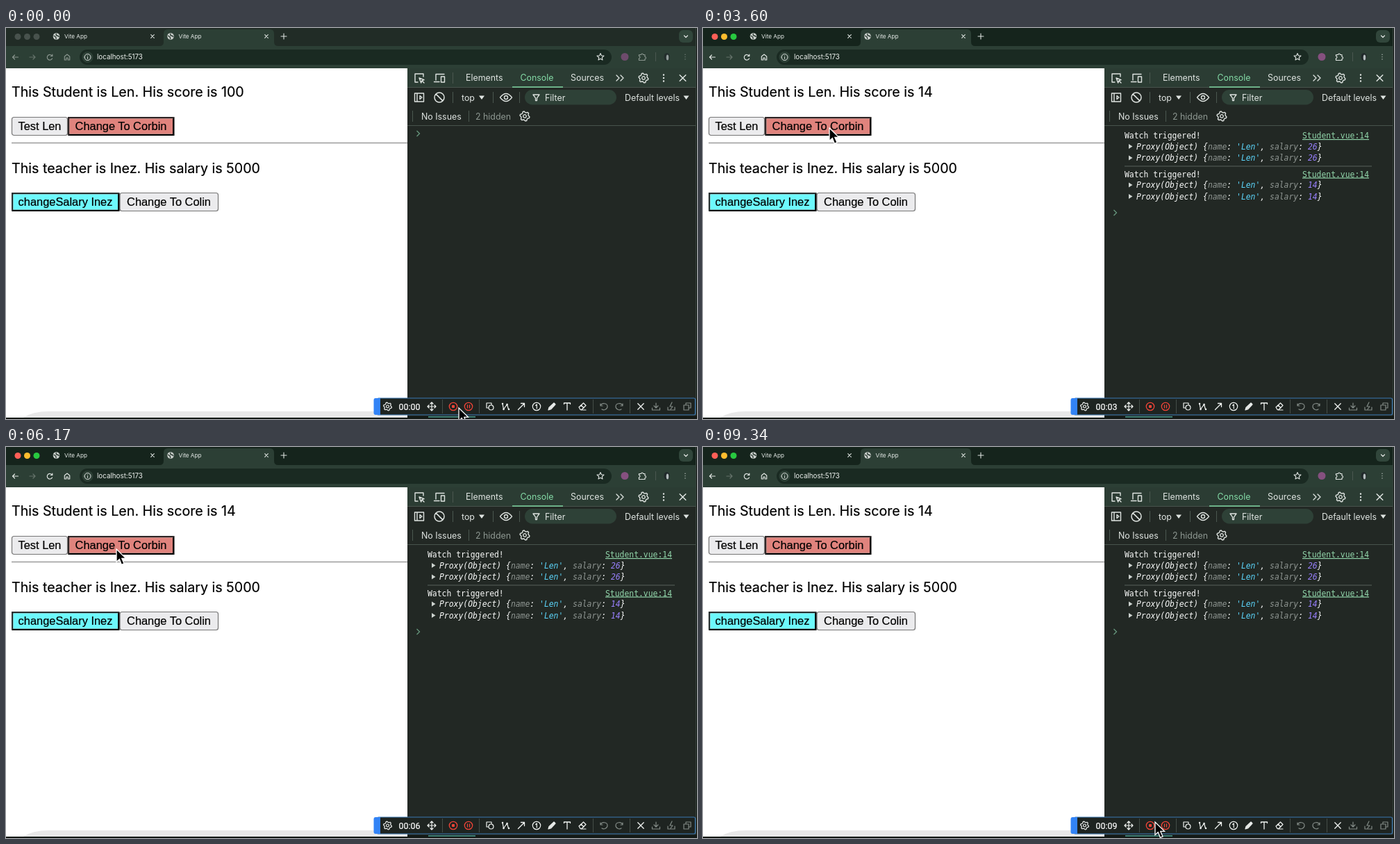
These frames come from a looping animation (995x563 px, 9430 ms). An HTML page:

```html
<!DOCTYPE html>
<html lang="en">
<head>
<meta charset="utf-8">
<title>Vite App</title>
<style>
  html, body { margin: 0; width: 100%; height: 100%; overflow: hidden; background: #111; }
  svg { display: block; width: 100vw; height: 100vh; }
  text { white-space: pre; font-family: Inter, sans-serif; }
  .tab { font-size: 8.2px; fill: #e6ebe8; }
  .page { font-size: 19.65px; fill: #000; stroke: #000; stroke-width: .2; }
  .button { font: 16.4px "Liberation Sans", Arial, sans-serif; fill: #000; stroke: #000; stroke-width: .2; text-anchor: middle; }
  .tools { font-size: 12.4px; fill: #dfe4e1; }
  .log { font: 11.4px "DejaVu Sans Mono", monospace; fill: #fafbfa; }
  .value { font-style: italic; }
  .key { fill: #8f9692; }
  .string { fill: #5cd5fb; }
  .number { fill: #9980ff; }
  .link { fill: #91d5aa; text-decoration: underline; }
</style>
</head>
<body>
<svg viewBox="0 0 995 563">
  <defs>
    <g id="gear" fill="none" stroke-linejoin="round">
      <path id="cog" stroke-width="1.4"/>
      <circle r="2.3" stroke-width="1.3"/>
    </g>
    <g id="globe">
      <circle r="4.8" fill="#c9cfcb"/>
      <path d="M-4 -1Q-2 0 -1 1T-.5 4M0-4Q-1-1 1-1T4 1" fill="none" stroke="#26352d" stroke-width="1.3"/>
    </g>
  </defs>

  <!-- Browser frame -->
  <path id="strip" d="M0 0H993V30H0Z"/>
  <path fill="#2c3f35" d="M0 26H221Q227 26 227 20V8Q227 2 233 2H380Q386 2 386 8V20Q386 26 392 26H993V58H0Z"/>
  <g id="lights"><circle cx="17" cy="12.5" r="4.5"/><circle cx="30.5" cy="12.5" r="4.5"/><circle cx="44" cy="12.5" r="4.5"/></g>
  <use href="#globe" x="72.5" y="12"/>
  <use href="#globe" x="237" y="12"/>
  <text class="tab" x="84" y="15">Vite App</text>
  <text class="tab" x="248.5" y="15">Vite App</text>
  <rect x="969" y="3" width="20" height="18" rx="6" fill="#31463b"/>
  <rect x="106" y="31" width="766" height="22" rx="11" fill="#1a2a22"/>
  <circle cx="117.5" cy="42" r="8" fill="#2c3f35"/>
  <text x="131" y="45.3" font-size="9.8" fill="#eef2ef">localhost:5173</text>
  <g id="badges">
    <circle cx="891" cy="41.5" r="5.5" fill="#85507f"/>
    <ellipse cx="951.5" cy="41.5" rx="4" ry="5.5" fill="#20282a"/>
    <ellipse cx="952.5" cy="42.5" rx="1.8" ry="4" fill="#b4bdbe"/>
  </g>

  <!-- Page -->
  <rect y="58" width="578" height="503" fill="#fff"/>
  <path d="M25 561Q38 552 62 552H578V561Z" fill="#e8e8e8"/>
  <path d="M8 165.5H578" stroke="#9a9a9a" stroke-width="1.5"/>
  <text class="page" x="8" y="99" id="student"></text>
  <text class="page" x="8" y="208.5">This teacher is Inez. His salary is 5000</text>
  <g stroke="#767676" stroke-width="1.2">
    <rect id="test" x="8.5" y="128.5" width="80" height="26" rx="3"/>
    <rect x="164" y="237.5" width="141.5" height="26" rx="3" fill="#ebebed"/>
  </g>
  <g id="swap">
    <path d="M89 155V128H242.5L240 130.5H91.5V152.5Z"/>
    <path d="M242.5 128V155H89L91.5 152.5H240V130.5Z"/>
    <path d="M91.5 130.5H240V152.5H91.5Z" fill="#e0837d"/>
  </g>
  <path d="M8 264V237H163.5L161 239.5H10.5V261.5Z" fill="#263030"/>
  <path d="M163.5 237V264H8L10.5 261.5H161V239.5Z"/>
  <path d="M10.5 239.5H161V261.5H10.5Z" fill="#6df9fd"/>
  <text class="button" x="48.5" y="147">Test Len</text>
  <text class="button" x="165.5" y="147">Change To Corbin</text>
  <text class="button" x="85.5" y="256">changeSalary Inez</text>
  <text class="button" x="234.5" y="256">Change To Colin</text>

  <!-- Developer tools -->
  <rect x="578" y="58" width="415" height="501" fill="#222824"/>
  <rect x="578" y="58" width="415" height="27.5" fill="#2b3c33"/>
  <rect x="747" y="89" width="132" height="21.5" rx="10.7" fill="#2e4137"/>
  <path d="M578 85.5H993M578 140.5H993" stroke="#48534c"/>
  <path d="M643.5 64V80M643.5 92V108M701.5 92V108M739.5 92V108M585.5 119V135M666.5 119V135M935.5 35V48" stroke="#4b5850"/>
  <path d="M729 85H802" stroke="#7fd6a2" stroke-width="1.6"/>
  <g class="tools">
    <text x="662" y="76.3">Elements</text>
    <text x="740.5" y="76.3" style="fill:#84dba7">Console</text>
    <text x="813" y="76.3">Sources</text>
    <text x="656" y="104.5">top</text>
    <text x="776" y="104.5">Filter</text>
    <text x="891" y="104.5">Default levels</text>
    <text x="598" y="131.5">No Issues</text>
    <text x="676" y="131.5" style="fill:#8d9791">2 hidden</text>
  </g>
  <g stroke="#dfe4e1"><use href="#gear" x="918" y="72"/><use href="#gear" x="747" y="127"/></g>
  <g id="logs"></g>
  <path id="prompt" d="M591.5 -4L595.5 0L591.5 4" fill="none" stroke="#67977d" stroke-width="1.3"/>

  <!-- Window edge and recorder bar -->
  <path d="M0 561H995V563H0ZM578 559H995V563H578ZM993 0H995V563H993Z" fill="#131916"/>
  <path d="M993.5 0V558" stroke="#35413b"/>
  <path d="M608 560H676" stroke="#4b9e91" stroke-width="1.5"/>
  <rect x="534.5" y="533" width="458" height="24" rx="2" fill="#1e2421" stroke="#3a78b4" stroke-width="1.2"/>
  <path d="M539 533V557H532Q529.5 557 529.5 554V536Q529.5 533 532 533Z" fill="#3283f6"/>
  <path d="M628.5 535V555M681.5 535V555M845.5 535V555M898.5 535V555" stroke="#444d48"/>
  <use href="#gear" stroke="#f2f4f3" transform="translate(549.5 545) scale(.85)"/>
  <text id="clock" x="565.5" y="549.6" style="font:12.4px Roboto,sans-serif" fill="#fff" stroke="#fff" stroke-width=".2"></text>

  <g id="icons" fill="none" stroke-linecap="round" stroke-linejoin="round"></g>
  <path id="cursor" d="M0 0V18.5L4.3 14.6L7.3 22.3L11 20.8L7.8 13.3H13.5Z" fill="#000" stroke="#fff" stroke-width="1.3"/>
</svg>
<script>
const LOOP = 9430;
const byId = id => document.getElementById(id);
const circle = r => `M${-r} 0a${r} ${r} 0 1 0 ${2 * r} 0a${r} ${r} 0 1 0 ${-2 * r} 0`;
const cross = r => `M${-r} ${-r}L${r} ${r}M${r} ${-r}L${-r} ${r}`;
const dots = r => `M0 ${-r}v.1M0 0v.1M0 ${r}v.1`;

// Six teeth, each with two outer and two inner corners
byId('cog').setAttribute('d', 'M' + Array.from({ length: 24 }, (_, i) => {
  const angle = (i + .5) * Math.PI / 12, radius = i % 4 < 2 ? 7 : 5.4;
  return [radius * Math.sin(angle), radius * Math.cos(angle)];
}).join('L') + 'Z');

const white = '#f0f3f1', grey = '#828a86', red = '#f04438', pale = '#dfe4e1';
// x, y, colour, line width, path
const icons = [
  [211, 12, pale, 1.1, cross(2.3)],
  [375, 12, pale, 1.1, cross(2.3)],
  [400, 12, pale, 1.1, 'M-4 0H4M0-4V4'],
  [979, 12, pale, 1.2, 'M-2.5-1L0 1.5L2.5-1'],
  [117.5, 42, pale, 1, circle(4.5) + 'M0-2v.1M0 0V2.2'],
  [856, 41.5, pale, 1.1, 'M0-5L1.4-1.7L5-1.4L2.3 1L3 4.5L0 2.7L-3 4.5L-2.3 1L-5-1.4L-1.4-1.7Z'],
  [595, 72, pale, 1.4, 'M6-2V-6H-6V6H-2M0 0L7 2.7L3.8 3.8L2.7 7ZM4 4L7 7'],
  [624, 72, pale, 1.4, 'M7-5.5H-5V3M-7.5 5.5H0M2.5-2H7.5V6H2.5Z'],
  [884, 72, pale, 1.3, 'M-5-4L-1 0L-5 4M1-4L5 0L1 4'],
  [947, 72, pale, 2.4, dots(4.5)],
  [974.5, 72, pale, 1.5, cross(4.3)],
  [595, 100, pale, 1.4, 'M-6.5-6H6.5V6H-6.5ZM-3-6V6M1-2.5L4 0L1 2.5Z'],
  [624, 100, pale, 1.5, circle(7) + 'M-4.9-4.9L4.9 4.9'],
  [720, 100, pale, 1.4, 'M-8.5 0Q0-11 8.5 0Q0 11-8.5 0' + circle(2.5)],
  [763.5, 100, pale, 1.3, 'M-4.5-4H4.5L1 .8V4.5H-1V.8Z'],
  [613, 545, white, 1.2, 'M-6 0H6M0-6V6M-2-4L0-6L2-4M-2 4L0 6L2 4M-4-2L-6 0L-4 2M4-2L6 0L4 2'],
  [644, 545, red, 1.3, circle(5.7)],
  [644, 545, red, 2, 'M-1-1H1V1H-1Z'],
  [666, 545, red, 1.3, circle(5.7) + 'M-1.5-2V2M1.5-2V2'],
  [697, 545, white, 1.2, 'M-2 2H-5V-5H2V-2M-2 1.5a3.5 3.5 0 1 0 7 0a3.5 3.5 0 1 0-7 0'],
  [719.5, 545, white, 1.2, 'M-4.5-4L-3 4L2-3L4 4'],
  [719.5, 545, white, 2.4, 'M-4.5-4h.1M-3 4h.1M2-3h.1M4.5 4h.1'],
  [742, 545, white, 1.3, 'M-4.5 4.5L4.5-4.5M-.5-4.5H4.5V.5'],
  [764, 545, white, 1.2, circle(5.7) + 'M-1.3-1.5L.3-3V3'],
  [786, 545, white, 1.2, 'M-5 5L-4 1.5L3-5L5-3L-1.5 4Z'],
  [786, 545, white, 2.2, 'M-3 3L3.5-3.5'],
  [808, 545, white, 1.3, 'M-4.5-3.5V-5H4.5V-3.5M0-5V5'],
  [830, 545, white, 1.2, 'M-5 1L1.5-5L5-1.5L-1 4.5H-3ZM-2-2L2 2M-2 5H5'],
  [861, 545, grey, 1.2, 'M-5-4V-1H-2M-5-1C-3-6 5-5 5 0C5 4 0 6-3 4'],
  [883, 545, grey, 1.2, 'M5-4V-1H2M5-1C3-6-5-5-5 0C-5 4 0 6 3 4'],
  [914, 545, white, 1.3, cross(4.2)],
  [936, 545, grey, 1.2, 'M0-5V2M-3-1L0 2L3-1M-5.5 2V5H5.5V2'],
  [958, 545, grey, 1.2, 'M1-6L-2 0H2L-1 4M-5 1V5H5V1'],
  [981, 545, grey, 1.2, 'M-5-2H2V5H-5ZM-2-2V-5H5V2H2']
];
// Toolbar icons that wake up with the window
const focusIcons = [
  [13.5, 42, 'M4 0H-4M-1-3L-4 0L-1 3'],
  [63, 42, 'M3.5-1.5A3.8 3.8 0 1 0 3.5 2M3.8-4V-1.5H1.3'],
  [88, 42, 'M-3.7 4V-1L0-4L3.7-1V4H1.2V1H-1.2V4Z'],
  [916, 41.5, 'M-4.5-3H-1.5a1.5 1.5 0 0 1 3 0H4V0a1.5 1.5 0 0 1 0 3V5H-4.5V2a1.5 1.5 0 0 0 0-3Z'],
  [978, 41.5, dots(3.3)]
];
const iconMarkup = (x, y, colour, width, d) =>
  `<path transform="translate(${x} ${y})" stroke="${colour}" stroke-width="${width}" d="${d}"/>`;
byId('icons').innerHTML =
  icons.map(icon => iconMarkup(...icon)).join('') +
  iconMarkup(38, 42, '#65736b', 1.2, 'M-4 0H4M1-3L4 0L1 3') +
  '<g id="awake">' + focusIcons.map(([x, y, d]) => iconMarkup(x, y, 'inherit', 1.2, d)).join('') + '</g>' +
  `<g fill="${pale}"><path d="M681 97.5h8l-4 5.5zM975.5 97.5h8l-4 5.5z"/></g>`;

const logEntry = (score, index) => {
  const row = y => `<path d="M613 ${y - 7.5}L618.5 ${y - 4}L613 ${y - .5}Z" fill="#cdd3cf"/>` +
    `<text class="log value" x="624" y="${y}">Proxy(Object) {<tspan class="key">name</tspan>: ` +
    `<tspan class="string">'Len'</tspan>, <tspan class="key">salary</tspan>: <tspan class="number">${score}</tspan>}</text>`;
  return `<g transform="translate(0 ${index * 55.5})" visibility="hidden">` +
    (index ? '<path d="M607 143.5H963" stroke="#59625d"/>' : '') +
    '<text class="log" x="607" y="159">Watch triggered!</text>' +
    '<text class="log link" x="863" y="159">Student.vue:14</text>' + row(174.5) + row(191) + '</g>';
};
const scores = [100, 26, 14];
byId('logs').innerHTML = scores.slice(1).map(logEntry).join('');

// time, x, y of the pointer tip
const track = [
  [0, 652, 547], [120, 652, 547], [900, 60, 142], [1350, 57, 140], [2300, 57, 140],
  [2720, 150, 141], [2850, 150, 141], [3200, 182, 144], [4350, 182, 144], [4720, 62, 143],
  [5600, 62, 143], [6050, 159, 147], [6720, 159, 147], [7040, 240, 140], [7550, 698, 125],
  [8100, 698, 125], [8800, 655, 535], [9150, 651, 540], [LOOP, 651, 540]
];
const within = (t, spans) => spans.some(([from, to]) => t >= from && t < to);
const testPresses = [[1400, 1540], [2080, 2200], [4830, 4950], [5300, 5420]];
const swapPresses = [[3400, 3520], [6350, 6470]];
const lightColours = ['#fe5f57', '#febc2e', '#28c840'];

function pointer(t) {
  const next = track.findIndex(point => point[0] > t);
  const [t0, x0, y0] = track[next - 1], [t1, x1, y1] = track[next];
  const k = (t - t0) / (t1 - t0), eased = k * k * (3 - 2 * k);
  return [x0 + (x1 - x0) * eased, y0 + (y1 - y0) * eased];
}

function draw(now) {
  const t = now % LOOP;
  const focused = t >= 700;
  const clicks = (t >= 1540) + (t >= 2200);

  byId('cursor').setAttribute('transform', `translate(${pointer(t)})`);
  byId('clock').textContent = '00:0' + Math.floor(t / 1000);
  byId('student').textContent = `This Student is Len. His score is ${scores[clicks]}`;
  byId('strip').setAttribute('fill', focused ? '#15241c' : '#212c26');
  byId('badges').setAttribute('opacity', focused ? 1 : .75);
  [...byId('lights').children].forEach((light, i) => light.setAttribute('fill', focused ? lightColours[i] : '#48524d'));
  byId('awake').setAttribute('stroke', focused ? pale : '#89958e');
  byId('test').setAttribute('fill', within(t, testPresses) ? '#f6f6f6' : '#ebebed');

  const pressed = within(t, swapPresses), [topLeft, bottomRight] = byId('swap').children;
  topLeft.setAttribute('fill', pressed ? '#000' : '#2e2525');
  bottomRight.setAttribute('fill', pressed ? '#2e2525' : '#000');

  [...byId('logs').children].forEach((entry, i) => entry.setAttribute('visibility', i < clicks ? 'visible' : 'hidden'));
  byId('prompt').setAttribute('transform', `translate(0 ${clicks ? 155 + clicks * 55.5 : 152})`);
  requestAnimationFrame(draw);
}
draw(0);
</script>
</body>
</html>
```
